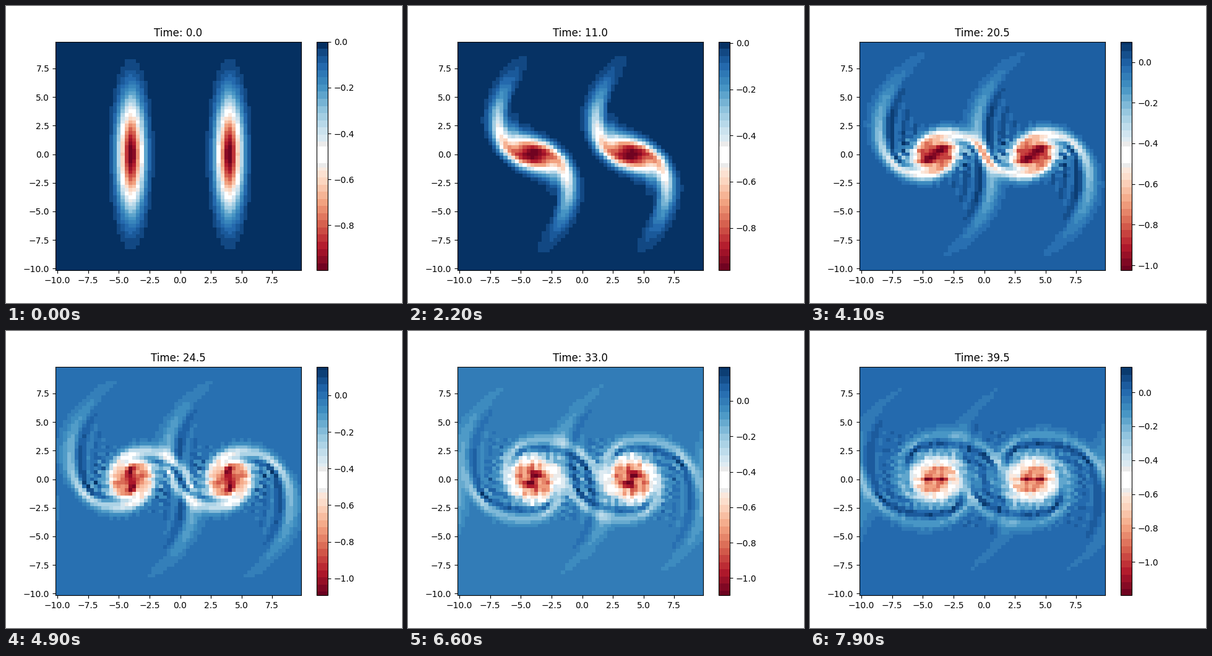
Write a matplotlib script that moves like this. It is 640x480 px and loops after 8000 ms.

```python
import numpy as np
import matplotlib.pyplot as plt
from matplotlib.animation import FuncAnimation
from matplotlib.colors import ListedColormap

N, HALF, NU = 64, 10.0, 0.001
STEP, SUBSTEPS, FRAMES = 0.5, 6, 80
BAND = 8

h = 2 * HALF / N
x = -HALF + h * np.arange(N)
X, Y = np.meshgrid(x, x)
k = 2 * np.pi * np.fft.fftfreq(N, h)
KX, KY = np.meshgrid(k, k)
K2 = KX**2 + KY**2
K2[0, 0] = 1.0


def diff(f, axis):
    """Central difference on the periodic grid."""
    return (np.roll(f, -1, axis) - np.roll(f, 1, axis)) / (2 * h)


def laplacian(f):
    return (sum(np.roll(f, s, a) for s in (-1, 1) for a in (-2, -1)) - 4 * f) / h**2


def rhs(w):
    """Each vortex is advected by its own stream function only."""
    spec = -np.fft.fft2(w) / K2
    spec[..., 0, 0] = 0
    psi = np.fft.ifft2(spec).real
    return NU * laplacian(w) + diff(psi, -1) * diff(w, -2) - diff(psi, -2) * diff(w, -1)


def rk4(w, dt):
    a = rhs(w)
    b = rhs(w + dt / 2 * a)
    c = rhs(w + dt / 2 * b)
    d = rhs(w + dt * c)
    return w + dt / 6 * (a + 2 * b + 2 * c + d)


def simulate():
    """Evolve both vortices independently and return their sum over time."""
    w = np.stack([-np.exp(-(X - c)**2 - Y**2 / 20) for c in (-4, 4)])
    states = [w.sum(axis=0)]
    for _ in range(FRAMES - 1):
        for _ in range(SUBSTEPS):
            w = rk4(w, STEP / SUBSTEPS)
        states.append(w.sum(axis=0))
    return states


BASE = plt.get_cmap("RdBu")(np.arange(256))


def banded(lo, hi):
    """RdBu in narrow bands, with a white middle and one band fitted to zero."""
    zero = int(np.clip(-lo / (hi - lo) * 256, 0, 255))
    start = min(zero - BAND // 2, 256 - BAND)
    group = (np.arange(256) - start) // BAND
    colors = np.empty_like(BASE)
    for g in np.unique(group):
        colors[group == g] = BASE[group == g].mean(axis=0)
    colors[group == 0] = BASE[zero]
    colors[115:144, :3] = 0.92
    colors[120:139, :3] = 1.0
    return ListedColormap(colors)


states = simulate()

fig, ax = plt.subplots(figsize=(6.4, 4.8), dpi=100)
mesh = ax.pcolormesh(X, Y, states[0], shading="nearest", cmap="RdBu")
fig.colorbar(mesh, ax=ax)
title = ax.set_title("Time: 0.0")


def update(i):
    w = states[i]
    lo, hi = w.min(), w.max()
    mesh.set_array(w)
    mesh.set_cmap(banded(lo, hi))
    mesh.set_clim(lo, hi)
    title.set_text(f"Time: {i * STEP:.1f}")
    return mesh, title


anim = FuncAnimation(fig, update, frames=FRAMES, interval=100,
                     repeat=True, repeat_delay=0, blit=False)
plt.show()
```
